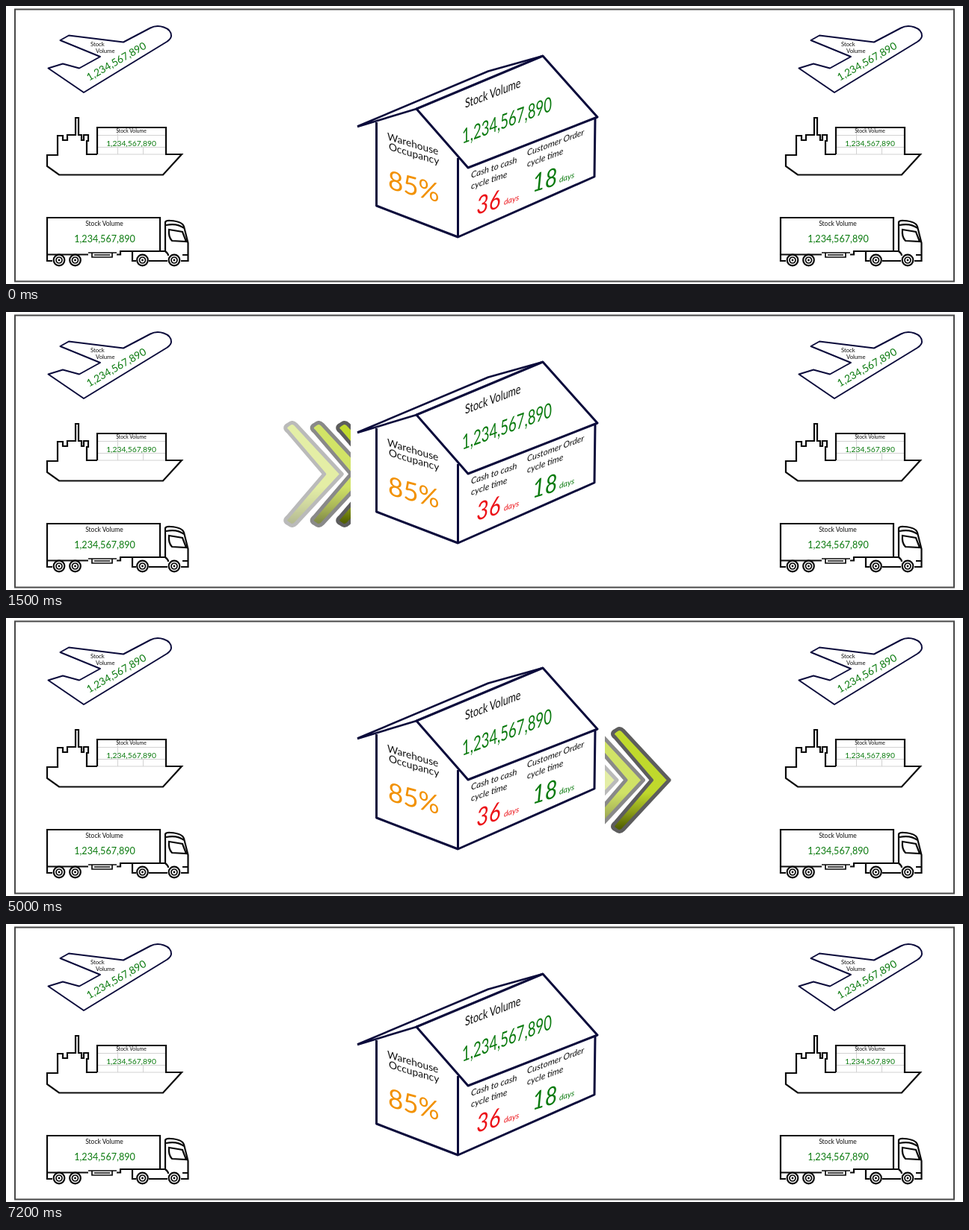
These frames come from a looping animation (1280 px wide and 373 px high, 7300 ms). An HTML page:

```html
<!DOCTYPE html>
<html lang="en">
<head>
<meta charset="utf-8">
<title>Stock flow</title>
<style>
html, body { margin: 0; width: 100%; height: 100%; overflow: hidden; background: #fff; }
svg { display: block; width: 100vw; height: 100vh; }
text { font-family: Lato, "Open Sans", sans-serif; fill: #111; }
.line { fill: none; stroke: #0a0a0a; stroke-width: 2.2; }
.navy { fill: none; stroke: #0b0b3b; stroke-width: 2; }
.house { stroke-width: 3; stroke-linejoin: round; }
.grid { fill: none; stroke: #d2d2d2; stroke-width: 1; }
.mid { text-anchor: middle; }
.green { fill: #0a7a0e; }
.red { fill: #ec1218; }
.amber { fill: #f29100; }
.slant { font-style: italic; }
</style>
</head>
<body>
<svg viewBox="0 0 1280 373" preserveAspectRatio="none">
  <defs>
    <linearGradient id="lime" gradientUnits="userSpaceOnUse" x1="0" y1="146" x2="0" y2="289">
      <stop offset="0" stop-color="#c1da2d"/>
      <stop offset=".62" stop-color="#bfd82c"/>
      <stop offset=".8" stop-color="#8b9d1a"/>
      <stop offset=".95" stop-color="#526000"/>
    </linearGradient>
    <clipPath id="gapIn"><rect x="258" y="140" width="203" height="156"/></clipPath>
    <clipPath id="gapOut"><rect x="801" y="140" width="222" height="156"/></clipPath>

    <path id="chevron" fill="url(#lime)" stroke="#5d5d5d" stroke-width="5" stroke-linejoin="round"
      d="M-27 217.5L-76 160Q-82 155-76 151.500L-73 149.500Q-69 147-65 151L-3.500 217.500L-65 284Q-69 288-73 285.500L-76 283.500Q-82 280-76 275Z"/>
    <g id="arrows">
      <use href="#chevron" x="-70" opacity=".42"/>
      <use href="#chevron" x="-34.500" opacity=".72"/>
      <use href="#chevron"/>
    </g>

    <g id="plane">
      <path class="navy" stroke-linejoin="round" d="M104 116L56.500 83.500L76 77.500L98 83.500L126 68L72.500 46L84 39.500L157 48.500L193 29.500C204 24 221 29 221 40Q221 44 215 48Z"/>
      <text x="113" y="54" font-size="7.700">Stock</text>
      <text x="120" y="62.500" font-size="7.700">Volume</text>
      <text class="green mid" font-size="13.800" transform="translate(150 78.500) rotate(-30)">1,234,567,890</text>
    </g>

    <g id="ship">
      <path class="grid" d="M123 173.500H213M123 189.500H213M123 199H213M149.500 164V199M183.500 189V199"/>
      <path class="line" d="M122 199V163H214V199H235L210 226.500H71L55 215V200H69V174H76V180H82V173H93V150H97V173H101V180H104V173H110V181H108V199H122"/>
      <text class="mid" x="167.500" y="170" font-size="6.800">Stock Volume</text>
      <text class="green mid" x="167.500" y="188" font-size="10.300">1,234,567,890</text>
    </g>

    <g id="wheel">
      <circle r="7.300" fill="#fff" stroke="#0a0a0a" stroke-width="2.200"/>
      <circle r="4" fill="none" stroke="#0a0a0a" stroke-width="1.700"/>
      <circle r="1.400"/>
    </g>
    <g id="truck">
      <path class="line" stroke-width="2" d="M62 342H55V284H206V329H152M55 333.500H110M148 333.500H153V329M169 329V342H174M191 342H216M206 329H213V290Q214 287.500 220 288Q236 289 238 296L243.500 318V342H234M214 294Q229 291 238 298M218 300L236 303L241 316L222 315Q217 310 218 300ZM213 329Q217 332 217 335M236 334H243"/>
      <path class="line" d="M110 331H148M115 331V337H142V331M118 334H139" style="stroke-width:1.700"/>
      <use href="#wheel" x="71" y="341"/>
      <use href="#wheel" x="92.500" y="341"/>
      <use href="#wheel" x="182.500" y="341"/>
      <use href="#wheel" x="225" y="341"/>
      <text class="mid" x="131.500" y="295" font-size="8.500">Stock Volume</text>
      <text class="green mid" x="132" y="317" font-size="12.600">1,234,567,890</text>
    </g>
  </defs>

  <rect width="1280" height="373" fill="#fff"/>
  <rect x="12" y="4.500" width="1256" height="365" fill="none" stroke="#484848" stroke-width="2"/>

  <use href="#plane"/><use href="#plane" x="1004"/>
  <use href="#ship"/><use href="#ship" x="988"/>
  <use href="#truck"/><use href="#truck" x="981"/>

  <path class="navy house" d="M495.500 156V268L604.500 310L787 229L788 151M604.500 310V204"/>
  <path class="navy house" d="M549 138L718 67L791 149L618 217Z"/>
  <path class="navy house" style="stroke-width:2.600" d="M470 161.500L645 87.500L718 67M470 162L549 138"/>

  <text font-size="13.700" transform="matrix(1 .3 0 1 510 179.500)">Warehouse</text>
  <text font-size="13.700" transform="matrix(1 .3 0 1 512 193)">Occupancy</text>
  <text class="amber" font-size="35" transform="matrix(1 .27 0 1 511 245)">85%</text>

  <text font-size="12.500" transform="matrix(1 -.38 0 1.400 614 137)">Stock Volume</text>
  <text class="green" font-size="18.500" transform="matrix(1 -.37 0 1.480 610 185)">1,234,567,890</text>

  <g class="slant">
    <text font-size="11.700" transform="matrix(1 -.34 0 1 622 231)">Cash to cash</text>
    <text font-size="11.700" transform="matrix(1 -.34 0 1 622 246)">cycle time</text>
    <text class="red" font-size="29" transform="matrix(1 -.3 0 1.150 629 280)">36</text>
    <text class="red" font-size="10.600" transform="matrix(1 -.34 0 1 666 267)">days</text>
    <text font-size="11.500" transform="matrix(1 -.37 0 1 697 201)">Customer Order</text>
    <text font-size="11.700" transform="matrix(1 -.36 0 1 697 216)">cycle time</text>
    <text class="green" font-size="29" transform="matrix(1 -.3 0 1.150 704 250)">18</text>
    <text class="green" font-size="10.600" transform="matrix(1 -.34 0 1 740 237)">days</text>
  </g>

  <g clip-path="url(#gapIn)"><use id="inbound" href="#arrows" visibility="hidden"/></g>
  <g clip-path="url(#gapOut)"><use id="outbound" href="#arrows" visibility="hidden"/></g>
</svg>
<script>
const LOOP = 7300, STEP = 100;

// Each key is [time in ms, x of the leading tip].
const runs = [
  { el: document.getElementById("inbound"),
    keys: [[100, 378], [900, 461], [1600, 533], [1700, 545.5], [2400, 623]] },
  { el: document.getElementById("outbound"),
    keys: [[4200, 804], [5000, 890.5], [5700, 964.5], [5800, 977.5], [6300, 1034], [7200, 1135]] }
];

function tipAt(keys, t) {
  const i = keys.findIndex(k => t < k[0]);
  if (i < 1) return null;
  const [t0, x0] = keys[i - 1], [t1, x1] = keys[i];
  return x0 + (x1 - x0) * (t - t0) / (t1 - t0);
}

function draw(ms) {
  const t = Math.floor((ms % LOOP) / STEP) * STEP;
  for (const { el, keys } of runs) {
    const x = tipAt(keys, t);
    el.setAttribute("visibility", x === null ? "hidden" : "visible");
    if (x !== null) el.setAttribute("x", x);
  }
}

function tick() {
  draw(performance.now());
  requestAnimationFrame(tick);
}
tick();
</script>
</body>
</html>
```
